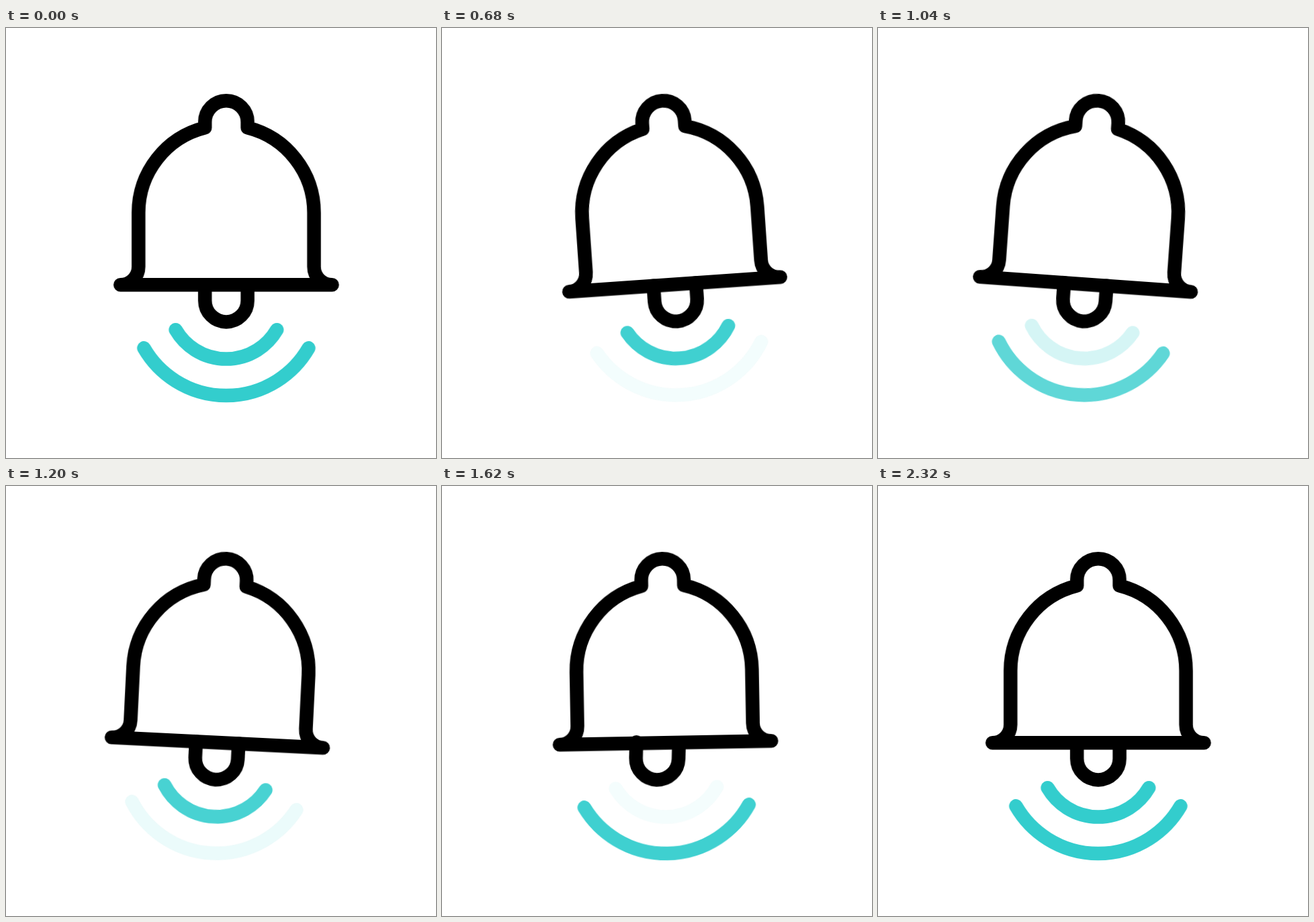
An HTML page for the animation above (2400 ms loop, 640x640 px).

```html
<!DOCTYPE html>
<html lang="en">
<head>
<meta charset="utf-8">
<title>Ringing bell</title>
<style>
  html, body { margin: 0; width: 100%; height: 100%; overflow: hidden; background: #fff; }
  svg { display: block; width: 100vw; height: 100vh; }

  path { fill: none; stroke: #000; stroke-width: 20.5; stroke-linecap: round; stroke-linejoin: round; }
  .wave { stroke: #33cdcd; }

  /* The swing pivot is the origin of the drawing. */
  .swing, .clapper, .wave {
    transform-origin: 0 0;
    animation: swing 2400ms cubic-bezier(.3333, 0, .6667, 1) infinite;
  }
  .clapper { animation-name: clapper; }
  .inner { animation-name: inner; }
  .outer { animation-name: outer; }

  @keyframes swing {
    0%, 8.333% { transform: rotate(0deg); }
    20.833% { transform: rotate(13deg); }
    33.333% { transform: rotate(-13deg); }
    45.833% { transform: rotate(6deg); }
    58.333% { transform: rotate(-6deg); }
    70.833%, 100% { transform: rotate(0deg); }
  }

  /* The clapper swings once more after the bell has settled. */
  @keyframes clapper {
    0%, 8.333% { transform: rotate(0deg); }
    20.833% { transform: rotate(13deg); }
    33.333% { transform: rotate(-13deg); }
    45.833% { transform: rotate(6deg); }
    58.333% { transform: rotate(-6deg); }
    70.833% { transform: rotate(3deg); }
    83.333%, 100% { transform: rotate(0deg); }
  }

  @keyframes inner {
    0%, 8.333% { opacity: 1; }
    15.417% { opacity: 0; }
    26.417% { opacity: 1; }
    39.5% { opacity: 0; }
    52.583% { opacity: 1; }
    65.667% { opacity: 0; }
    78.75%, 100% { opacity: 1; }
  }

  @keyframes outer {
    0%, 8.333% { opacity: 1; }
    15.417%, 26.417% { opacity: 0; }
    39.5% { opacity: 1; }
    52.583% { opacity: 0; }
    65.667% { opacity: 1; }
    78.75% { opacity: 0; }
    96.25%, 100% { opacity: 1; }
  }
</style>
</head>
<body>
<svg viewBox="0 0 640 640">
  <g transform="translate(327.8 114)">
    <g class="swing">
      <path class="wave inner" d="M-75.3 335.2A87 87 0 0 0 75.3 335.2"/>
      <path class="wave outer" d="M-122.5 362.4A141.5 141.5 0 0 0 122.5 362.4"/>
    </g>
    <path class="clapper" d="M-31.7 268.3V291.7A31.7 31.7 0 0 0 31.7 291.7V268.3"/>
    <g class="swing">
      <path d="M-157.6 268.3A27 27 0 0 0 -130.6 241.3V161A130.6 130.6 0 0 1 -31.7 34.4V26
               A31.7 31.7 0 0 1 31.7 26V34.4A130.6 130.6 0 0 1 130.6 161V241.3
               A27 27 0 0 0 157.6 268.3Z"/>
    </g>
  </g>
</svg>
</body>
</html>
```
